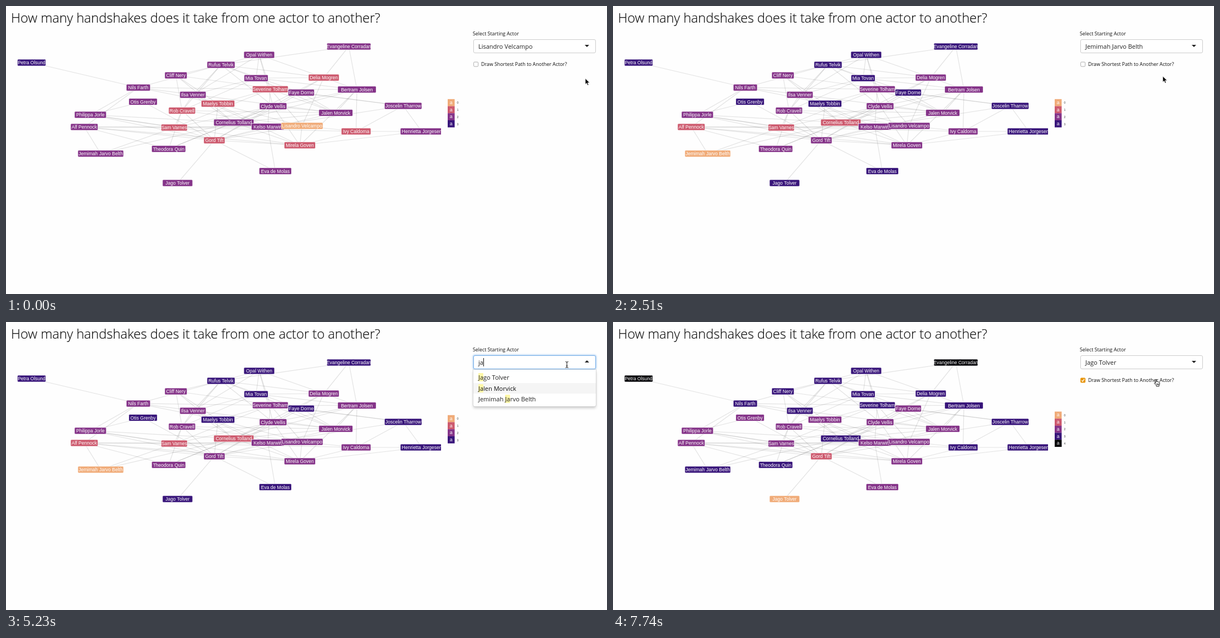
An HTML page for the animation above (8000 ms loop, 1079 by 519 pixels).

```html
<!DOCTYPE html>
<html lang="en">
<head>
<meta charset="utf-8">
<title>Handshakes between actors</title>
<style>
html, body { margin: 0; width: 100%; height: 100%; overflow: hidden; background: #fefefe; }
body { position: relative; font: 11px "Open Sans", sans-serif; color: #222; }
svg, .abs { position: absolute; box-sizing: border-box; white-space: pre; }
svg { left: 0; top: 0; overflow: visible; }
h1 { left: 9px; top: 4px; margin: 0; font-size: 23.55px; line-height: 34px; font-weight: 300; color: #111; -webkit-text-stroke: .2px #111; }
.small { font-size: 8.83px; line-height: 14px; color: #111; }
.field { left: 838.5px; top: 59.5px; width: 220px; height: 25.5px; padding-left: 8.5px; line-height: 24px;
  border: 1px solid #ccc; border-radius: 3px; background: #fff; }
.field.open { border-color: #75aee8; box-shadow: 0 0 3px 1px #a9cdf1; }
.field i { position: absolute; left: 199px; top: 9.5px; border: 4px solid transparent; border-top-color: #222; border-bottom: 0; }
.field.open i { top: 8.5px; border-top: 0; border-bottom: 4px solid #222; }
.field b { display: inline-block; width: 1px; height: 15px; margin: 0 -1px 0 0; background: #111; vertical-align: -3.5px; }
.menu { left: 838.5px; top: 86px; width: 220px; padding: 4.4px 0; overflow: hidden; background: #fff;
  border-radius: 0 0 3px 3px; box-shadow: 0 0 0 .7px #ccc, 0 3px 5px rgba(0,0,0,.22); }
.menu p { margin: 0; padding-left: 9.5px; height: 19.2px; line-height: 19.2px; }
.menu .on { background: #f5f5f5; color: #111; }
.menu.long { height: 148px; padding: 0 11px 0 0; }
.menu.long p { position: relative; top: -8.1px; }
.menu.long::before { content: ""; position: absolute; right: 0; top: 0; width: 10px; height: 100%; background: #fafafa; border-left: 1px solid #e8e8e8; }
.menu.long::after { content: ""; position: absolute; right: 2px; top: 82px; width: 6px; height: 27px; border-radius: 3px; background: #c1c1c1; }
mark { background: #fef7a9; color: inherit; border-radius: 1px; }
</style>
</head>
<body>
<svg id="plot" width="1079" height="519"></svg>
<h1 class="abs">How many handshakes does it take from one actor to another?</h1>
<div class="abs small" style="left:838px;top:42.5px">Select Starting Actor</div>
<div class="abs small" style="left:853px;top:98px">Draw Shortest Path to Another Actor?</div>
<div id="panel"></div>
<svg id="over" width="1079" height="519"></svg>
<script>
const LOOP = 8000;
const COLORS = ['#f0ab78', '#cd5a6e', '#853489', '#38157a', '#000004'];

// name, centre x, centre y, label width
const actors = [
  ['Petra Olsund', 46, 102, 51], ['Evangeline Corradan', 615.5, 73, 79],
  ['Opal Withen', 454.5, 88, 55], ['Rufus Telvik', 386, 106, 50],
  ['Cliff Nery', 305, 125, 40], ['Mia Tovan', 449, 130, 43],
  ['Delia Mogren', 570.5, 129, 55], ['Nils Farth', 237.5, 147, 43],
  ['Severine Tolham', 474.5, 150, 64], ['Faye Dorne', 530, 156, 47],
  ['Bertram Jolsen', 630, 150.5, 69], ['Ilsa Venner', 335.5, 160, 47],
  ['Otis Grenby', 246, 172.5, 51], ['Maelys Tobbin', 380.5, 176, 60],
  ['Clyde Vellis', 479.5, 180.5, 49], ['Joscelin Tharrow', 713, 180, 67],
  ['Rob Cravell', 316, 188.5, 48], ['Jalen Morvick', 592, 192.5, 61],
  ['Philippa Jorle', 151.5, 196, 57], ['Cornelius Tolland', 409, 210, 72],
  ['Alf Pennock', 140.5, 218, 49], ['Sam Varnes', 302, 219, 47],
  ['Kelso Marwin', 470, 217.5, 59], ['Ivy Caldoma', 628.5, 226, 53],
  ['Henrietta Jorgesen', 746.5, 226, 77], ['Gord Tift', 374, 242, 38],
  ['Mirela Goven', 527.5, 251, 56], ['Jemimah Jarvo Belth', 170, 266, 82],
  ['Theodora Quin', 292, 257.5, 61], ['Eva de Molas', 483.5, 297.5, 58],
  ['Jago Tolver', 308, 319, 54], ['Lisandro Velcampo', 531.5, 216, 75],
].map(([name, x, y, w]) => ({ name, x, y, w, links: [] }));
const byFirst = Object.fromEntries(actors.map(a => [a.name.split(' ')[0], a]));

const edges = `Gord: Jago Lisandro Faye Otis Maelys Clyde Rob Jalen Philippa Alf Sam Kelso Mirela Eva
Lisandro: Delia Severine Maelys Rob Sam Ivy Mirela
Jemimah: Cornelius Alf Sam
Petra: Nils
Evangeline: Rufus Bertram Delia
Delia: Rufus Mia Opal Bertram Clyde Cornelius
Rufus: Opal Mia Ilsa Faye Rob Clyde Cliff
Opal: Severine Clyde Mia Ilsa
Cliff: Rob Faye Maelys Cornelius
Mia: Bertram Jalen Rob Ilsa
Nils: Maelys Severine Philippa Alf Rufus Jalen
Severine: Jalen Bertram Joscelin Kelso Maelys Sam
Bertram: Jalen Clyde Cornelius Ivy Mirela
Ilsa: Rob Cornelius Kelso Mirela
Clyde: Cornelius Jalen Sam Theodora Mirela
Joscelin: Kelso Faye Ivy Henrietta
Rob: Sam Theodora Jalen
Jalen: Cornelius Faye
Philippa: Otis Sam Cornelius Mirela
Alf: Sam Theodora Kelso Mirela
Ivy: Sam Henrietta Mirela
Mirela: Henrietta Cornelius
Kelso: Eva
Theodora: Cornelius`.split('\n').flatMap(row => {
  const [from, to] = row.split(': ');
  return to.split(' ').map(t => [byFirst[from], byFirst[t]]);
});
for (const [a, b] of edges) { a.links.push(b); b.links.push(a); }

// Breadth-first handshake count from one actor to all others
function handshakes(root) {
  const dist = new Map([[root, 0]]);
  for (const [a, d] of dist)
    for (const b of a.links) if (!dist.has(b)) dist.set(b, d + 1);
  return dist;
}

const text = (x, y, size, fill, str, anchor = 'middle') =>
  `<text x="${x}" y="${y}" font-size="${size}" fill="${fill}" text-anchor="${anchor}">${str}</text>`;

function drawPlot(first) {
  const dist = handshakes(byFirst[first]);
  const lines = edges.map(([a, b]) => `M${a.x} ${a.y}L${b.x} ${b.y}`)
    .map(d => `<path d="${d}" stroke="#000" stroke-opacity=".11" stroke-width="1.2"/>`).join('');
  const labels = actors.map(a =>
    `<rect x="${a.x - a.w / 2}" y="${a.y - 6}" width="${a.w}" height="12" rx="1.8" stroke="#fff" stroke-width=".7" fill="${COLORS[dist.get(a)]}"/>` +
    text(a.x, a.y + 3, 8.5, '#fff', a.name)).join('');
  const count = Math.max(...dist.values()) + 1;
  const legend = COLORS.slice(0, count).map((c, i) => {
    const y = 193.2 + (i - count / 2) * 12.7;
    return `<rect x="793" y="${y}" width="12.5" height="12.8" fill="${c}"/>` +
      text(799.2, y + 9, 8.4, '#fff', 'a') + text(809.5, y + 8.6, 5.4, '#444', i, 'start');
  }).join('');
  plot.innerHTML = `<clipPath id="area"><path d="M0 40H781V400H0Z"/></clipPath>
    <g font-family="Liberation Sans, Arial, sans-serif"><g clip-path="url(#area)">${lines}${labels}</g>${legend}</g>`;
}

// Brackets mark the highlighted letters
const menus = {
  long: ['[Jago] Tolver', '[Ja]len Morvick', 'Jemimah [Ja]rvo Belth', '[J]oscelin Tharrow',
    'Kelso Marwin', 'Lisandro Velcampo', 'Maelys Tobbin', 'Mirela Goven'],
  ja: ['[Ja]go Tolver', '[Ja]len Morvick', 'Jemimah [Ja]rvo Belth'],
  jago: ['[Jago] Tolver'],
};

function drawPanel({ value, menu, active, caret }) {
  const rows = menu ? menus[menu].map((s, i) => `<p${i === active ? ' class="on"' : ''}>` +
    s.replace('[', '<mark>').replace(']', '</mark>') + '</p>').join('') : '';
  panel.innerHTML =
    `<div class="abs field ${menu ? 'open' : ''}">${value}${caret ? '<b></b>' : ''}<i></i></div>` +
    (menu ? `<div class="abs menu ${menu}">${rows}</div>` : '');
}

const pointers = {
  arrow: '<path d="M0 0V10.8L2.5 8.5 4.2 12.6 6.1 11.8 4.4 7.8H7.8Z" fill="#000" stroke="#fff" stroke-width=".8"/>',
  hand: `<path d="M2.6 7.5V1.5a1 1 0 0 1 2 0V5a1 1 0 0 1 1.9.2 1 1 0 0 1 1.8.4.9.9 0 0 1 1.5.7V9l-1 2.2v1.6H3.9V11.3
    L.6 7.6A1 1 0 0 1 2 6.4ZM4.9 8v2.4M6.4 8v2.4M7.8 8v2.4" fill="#fff" stroke="#000" stroke-width=".9"/>`,
  beam: '<path d="M-2.5-5.5Q0-5.5 0-4 0-5.5 2.5-5.5M0-4V4M-2.5 5.5Q0 5.5 0 4 0 5.5 2.5 5.5M-1.3 2H1.3" fill="none" stroke="#111"/>',
};
const boxes = {
  off: '<rect x="839.7" y="101" width="8" height="8" rx="1.5" fill="#fff" stroke="#999" stroke-width=".8"/>',
  pressed: '<rect x="839.7" y="101" width="8" height="8" rx="1.5" fill="#ddd" stroke="#999" stroke-width=".8"/>',
  on: `<rect x="839.2" y="100.5" width="9" height="9" rx="1.8" fill="#e8960c"/>
    <path d="M841.5 105.2L843.2 107 846.2 102.6" fill="none" stroke="#fff" stroke-width="1.3"/>`,
};

function drawOver({ menu, box, cursor: [kind, x, y] }) {
  over.innerHTML = (menu ? '' : boxes[box]) + `<g transform="translate(${x} ${y})">${pointers[kind]}</g>`;
}

// Each step changes only the listed parts of the state
const steps = [
  [0, { root: 'Lisandro', value: 'Lisandro Velcampo', menu: '', caret: false, box: 'off', cursor: ['arrow', 1040, 130.5] }],
  [630, { cursor: ['arrow', 1040, 98.5] }],
  [840, { cursor: ['hand', 1037, 75.5] }],
  [1040, { cursor: ['hand', 1037, 69.5] }],
  [1250, { menu: 'long', active: 5, caret: true, cursor: ['beam', 1040, 75] }],
  [1670, { caret: false, cursor: ['hand', 1010, 105] }],
  [1880, { active: 2, cursor: ['hand', 984.3, 127] }],
  [2090, { value: 'Jemimah Jarvo Belth', menu: '', cursor: ['arrow', 987, 126.5] }],
  [2510, { root: 'Jemimah' }],
  [2920, { cursor: ['arrow', 1004, 84.5] }],
  [3130, { cursor: ['hand', 1004, 77] }],
  [3550, { menu: 'long', caret: true, cursor: ['beam', 1007, 77] }],
  [3970, { caret: false }],
  [4390, { value: '', active: -1 }],
  [4600, { caret: true }],
  [5230, { value: 'ja', menu: 'ja', active: 1 }],
  [5440, { value: 'jago', menu: 'jago', active: 0 }],
  [5860, { value: 'Jago Tolver', menu: '', caret: false, cursor: ['hand', 1004, 77] }],
  [6270, { root: 'Jago' }],
  [7110, { cursor: ['hand', 985.5, 96.5] }],
  [7320, { cursor: ['hand', 971.5, 103] }],
  [7530, { box: 'pressed' }],
  [7740, { box: 'on' }],
];

let shown = 0, root = '';
function frame() {
  const now = performance.now() % LOOP;
  const past = steps.filter(([t]) => t <= now);
  if (past.length !== shown) {
    shown = past.length;
    const state = Object.assign({}, ...past.map(([, change]) => change));
    if (state.root !== root) drawPlot(root = state.root);
    drawPanel(state);
    drawOver(state);
  }
  requestAnimationFrame(frame);
}
frame();
</script>
</body>
</html>
```
